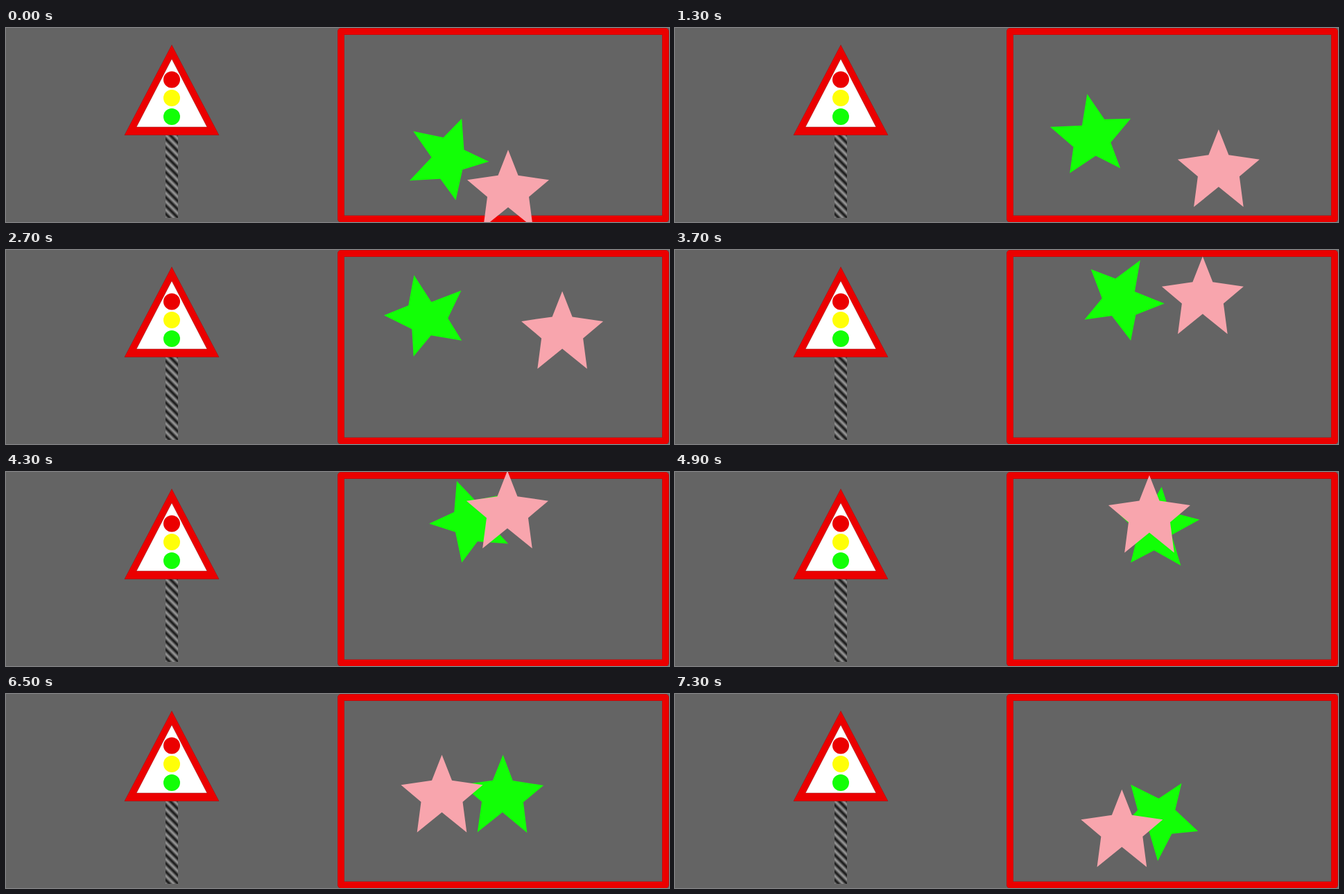
These frames come from a looping animation (956 by 280 pixels, 7400 ms). An HTML page:

```html
<!DOCTYPE html>
<html lang="en">
<head>
<meta charset="utf-8">
<title>Turning stars</title>
<style>
  html, body { margin: 0; width: 100%; height: 100%; overflow: hidden; background: #646464; }
  svg { display: block; }
</style>
</head>
<body>
<svg width="956" height="280" viewBox="0 0 956 280">
  <defs>
    <linearGradient id="stripes" gradientUnits="userSpaceOnUse" spreadMethod="reflect" x1="230" y1="160" x2="233" y2="157">
      <stop offset="0" stop-color="#1c1c1c"/>
      <stop offset=".2" stop-color="#282828"/>
      <stop offset=".8" stop-color="#888"/>
      <stop offset="1" stop-color="#949494"/>
    </linearGradient>
    <path id="star" d="M0-62 14.5-25 59-18.5 30 6 35.8 50 0 21-35.8 50-30 6-59-18.5-14.5-25Z"/>
  </defs>

  <rect x="230" y="154" width="18" height="120" fill="url(#stripes)"/>
  <path d="M239 24.5 307 154.5H171Z" fill="#eb0000" stroke="#a01414" stroke-width=".6"/>
  <path d="M239 44.5 290 143H188Z" fill="#fff" stroke="#a01414" stroke-width=".6"/>
  <circle cx="239" cy="74.5" r="12" fill="#eb0000"/>
  <circle cx="239" cy="101" r="12" fill="#ffff08"/>
  <circle cx="239" cy="128" r="12" fill="#12ff06"/>

  <g fill="none" stroke-linejoin="round">
    <rect x="483" y="5" width="468" height="270.5" stroke="#a01414" stroke-width="10"/>
    <rect x="483" y="5" width="468" height="270.5" stroke="#eb0000" stroke-width="9"/>
  </g>

  <use id="green" href="#star" fill="#12ff06"/>
  <use id="pink" href="#star" fill="#f8a5ad"/>
</svg>
<script>
  const LOOP = 7400, STEP = 100;
  const START = 4.2, SPEED = 42.75, RAMP = 0.54;
  const orbit = { x: 717.5, y: 149, r: 89 };
  const pivot = { x: 657.2, y: 130.8 };
  const green = document.getElementById('green');
  const pink = document.getElementById('pink');

  // Turn angle in degrees: a short run-up, then steady speed.
  function turn(s) {
    const run = s < RAMP ? s * s / (2 * RAMP) : s - RAMP / 2;
    return START + SPEED * run;
  }

  function draw(now) {
    const ms = Math.floor((now % LOOP) / STEP) * STEP;
    const angle = turn(ms / 1000);
    const rad = angle * Math.PI / 180;
    const x = orbit.x + orbit.r * Math.sin(rad);
    const y = orbit.y + orbit.r * Math.cos(rad);
    pink.setAttribute('transform', `translate(${x} ${y})`);
    // The green star swings around its own left tip.
    green.setAttribute('transform',
      `translate(${pivot.x} ${pivot.y}) rotate(${angle + 90}) translate(59 18.5)`);
  }

  const begin = performance.now();
  function tick() {
    draw(performance.now() - begin);
    requestAnimationFrame(tick);
  }
  tick();
</script>
</body>
</html>
```
